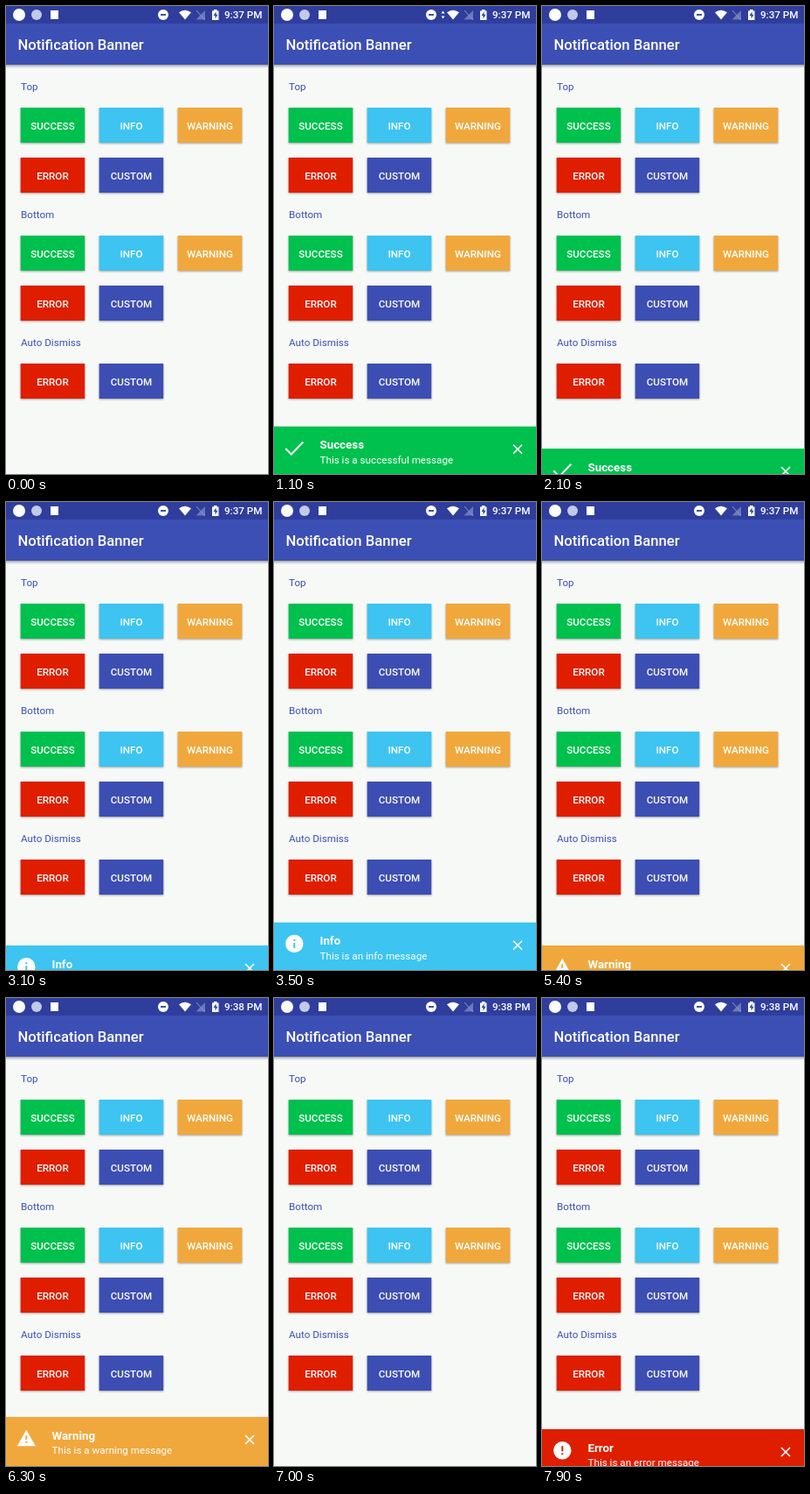
Recreate the animation shown at these times as an HTML page. Size 300x534 px, loop 8000 ms.

```html
<!DOCTYPE html>
<html lang="en">
<head>
<meta charset="utf-8">
<title>Notification Banner</title>
<style>
  html, body { margin: 0; width: 100%; height: 100%; overflow: hidden; background: #f7f9f7; }
  svg { display: block; width: 100vw; height: 100vh; font-family: Roboto, sans-serif; font-size: 11.67px; }
  .medium { font-weight: 500; }
  .button rect { filter: drop-shadow(0 1px 1px rgba(0, 0, 0, .35)); }
  .button text { fill: #fff; font-weight: 500; text-anchor: middle; }
  .label { fill: #3c4eb3; }
  .heading { font-size: 13.33px; font-weight: 700; }
</style>
</head>
<body>
<svg viewBox="0 0 300 534" preserveAspectRatio="none">
  <defs>
    <linearGradient id="shade" x2="0" y2="1">
      <stop stop-color="#000" stop-opacity=".32"/>
      <stop offset="1" stop-color="#000" stop-opacity="0"/>
    </linearGradient>
  </defs>
  <rect width="300" height="534" fill="#f7f9f7"/>
  <rect y="67" width="300" height="4" fill="url(#shade)"/>
  <rect width="300" height="67" fill="#3c4fb4"/>
  <rect width="300" height="20" fill="#2f3e9c"/>

  <g id="status" fill="#fff">
    <circle cx="15" cy="10" r="7"/>
    <circle cx="35" cy="10" r="6" fill="#c3c9e8"/>
    <rect x="51" y="5" width="9" height="10"/>
    <circle cx="180" cy="10" r="6"/>
    <path d="M177 10h6" stroke="#2f3e9c" stroke-width="1.8"/>
    <path id="arrows" d="M193.5 5.5l2 3h-4zM193.5 14.5l2-3h-4z"/>
    <path d="M198 7.3Q205 2.300 212 7.300L205 15.500z"/>
    <path d="M228 5v10.500h-10.500z" fill="#6d78bb"/>
    <path d="M218 5l10 11" stroke="#8e97cc" fill="none"/>
    <path d="M236 5.500h2V4h3.500v1.500h2V16H236z"/>
    <path d="M240.500 6.500l-3 4.500h2v3.500l3-4.700h-2z" fill="#2f3e9c"/>
    <text id="clock" class="medium" x="250" y="14.300">9:37 PM</text>
  </g>
  <text class="medium" x="13.500" y="50" fill="#fff" font-size="16.67">Notification Banner</text>
  <g id="page"></g>
  <g id="banners"></g>
</svg>
<script>
const LOOP = 8000, STEP = 100, HEIGHT = 56, TOP = 478;
const colors = { success: '#00c04e', info: '#3dc4f1', warning: '#f0a83d', error: '#df1e00', custom: '#3c4eb3' };
const byId = id => document.getElementById(id);

const button = (kind, x, y) => `<g class="button" transform="translate(${x} ${y})">
  <rect width="73.5" height="40" fill="${colors[kind]}"/>
  <text x="36.75" y="24.5">${kind.toUpperCase()}</text></g>`;

const section = (title, y, kinds) => `<text class="label" x="17" y="${y}">${title}</text>` +
  kinds.map((kind, i) => button(kind, 16.7 + i % 3 * 90, y + 20 + Math.floor(i / 3) * 57)).join('');

const allKinds = Object.keys(colors);
byId('page').innerHTML = section('Top', 96, allKinds) + section('Bottom', 242, allKinds) +
  section('Auto Dismiss', 388, ['error', 'custom']);

// Icons are centred on the origin.
const disc = mark => `<circle r="10.2" fill="#fff"/>${mark}`;
const icons = {
  success: '<path d="M-10 1l6.500 6.500L10-6.500" fill="none" stroke="#fff" stroke-width="2"/>',
  info: disc(`<path d="M-1-5h2v2h-2zM-1-1h2v6h-2z" fill="${colors.info}"/>`),
  warning: `<path d="M0-9.500L10.500 9h-21z" fill="#fff"/>
    <path d="M-1-3h2v4.500h-2zM-1 3.500h2v2h-2z" fill="${colors.warning}"/>`,
  error: disc(`<path d="M-1-5h2v6h-2zM-1 3h2v2h-2z" fill="${colors.error}"/>`)
};

// Each banner halves its distance every step on entry; exit lists the offsets on leaving.
const shows = [
  { kind: 'success', text: 'a successful', enter: 700, leave: 1900, exit: [2, 11, 27, 49] },
  { kind: 'info', text: 'an info', enter: 3100, leave: 4600, exit: [2, 11, 27, 49] },
  { kind: 'warning', text: 'a warning', enter: 5400, leave: 6800, exit: [11, 30] },
  { kind: 'error', text: 'an error', enter: 7800, leave: LOOP, exit: [] }
];

byId('banners').innerHTML = shows.map(({ kind, text }) => `<g fill="#fff">
  <rect width="300" height="60" fill="${colors[kind]}"/>
  <g transform="translate(23.3 24.3)">${icons[kind]}</g>
  <text class="heading" x="52.500" y="25.500">${kind[0].toUpperCase() + kind.slice(1)}</text>
  <text x="52.500" y="42">This is ${text} message</text>
  <path d="M274 21l10 10M284 21l-10 10" stroke="#fff" stroke-width="1.600"/>
</g>`).join('');
const banners = [...byId('banners').children];

function offsetAt({ enter, leave, exit }, time) {
  if (time < enter) return HEIGHT;
  if (time >= leave) return exit[(time - leave) / STEP] ?? HEIGHT;
  const step = (time - enter) / STEP;
  return step < 6 ? HEIGHT / 2 ** (step + 1) : 0;
}

function draw() {
  const time = Math.floor(performance.now() % LOOP / STEP) * STEP;
  shows.forEach((show, i) => {
    const offset = offsetAt(show, time);
    banners[i].setAttribute('transform', `translate(0 ${TOP + offset})`);
    banners[i].setAttribute('visibility', offset < HEIGHT ? 'visible' : 'hidden');
  });
  byId('clock').textContent = time < 6200 ? '9:37 PM' : '9:38 PM';
  byId('arrows').setAttribute('visibility', time >= 700 && time < 1900 ? 'visible' : 'hidden');
  requestAnimationFrame(draw);
}
draw();
</script>
</body>
</html>
```
